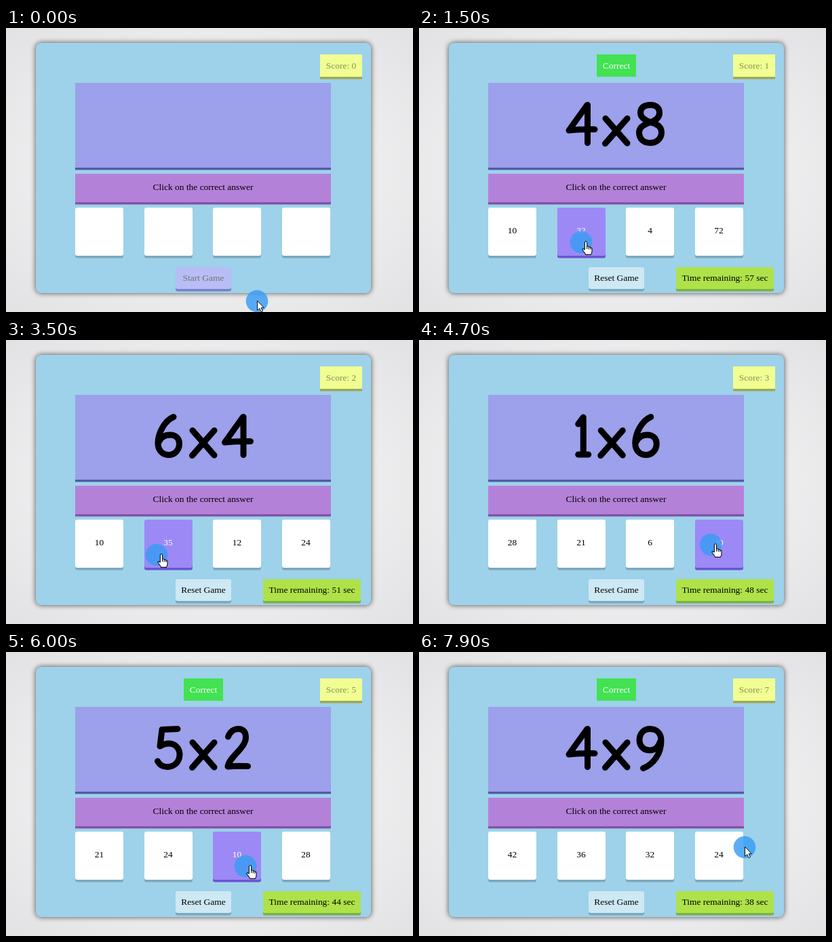
Recreate the animation shown at these times as an HTML page. Size 600 px wide and 419 px high, loop 8000 ms.

```html
<!DOCTYPE html>
<html lang="en">
<head>
<meta charset="utf-8">
<title>Times table game</title>
<style>
html, body { margin: 0; width: 100%; height: 100%; overflow: hidden; }
body {
  position: relative;
  font: 13.45px "Liberation Serif", "Times New Roman", serif;
  background: radial-gradient(ellipse at 50% 50%, #f4f4f5 30%, #e2e2e4 100%);
}
#stage { position: absolute; left: 0; top: 0; width: 600px; height: 419px; overflow: hidden; }
#stage > * { position: absolute; box-sizing: border-box; text-align: center; white-space: nowrap; }
#panel {
  left: 44px; top: 22px; width: 494px; height: 369px; border-radius: 8px;
  background: #9dd2ea; box-shadow: 0 0 7px 1px rgba(0, 0, 0, .55);
}
#score {
  left: 463px; top: 39px; width: 62px; height: 33px; line-height: 33px;
  background: #f1ff92; color: #888e5f; box-shadow: 0 3.4px #9da853;
}
#correct {
  left: 262px; top: 39px; width: 58px; height: 33px; line-height: 33px;
  background: #42e252; color: #fff;
}
#question {
  left: 102px; top: 81px; width: 377px; height: 125px;
  background: #9da0ea; box-shadow: 0 3.4px #535aa8;
}
#hint {
  left: 102px; top: 214.5px; width: 377px; height: 42px; line-height: 39px;
  background: #b481d9; box-shadow: 0 3.4px #8153a8;
}
.key {
  --h: 0%;
  --idle: #fff;
  border-radius: 3px;
  background: color-mix(in srgb, #9c89f6 var(--h), var(--idle));
  color: color-mix(in srgb, #fff var(--h), #000);
  box-shadow: 0 3.4px color-mix(in srgb, #6b54d3 var(--h), #7ea8bb);
}
.choice { top: 265px; width: 71px; height: 71px; line-height: 67px; }
#start { --idle: #cee8f4; left: 250px; top: 353px; width: 82px; height: 32px; line-height: 32px; }
#timer {
  left: 379px; top: 353px; width: 144px; height: 32px; line-height: 32px; border-radius: 2px;
  background: #aee248; box-shadow: 0 3.4px #83af41;
}
#art { left: 0; top: 0; }
#sum { fill: none; stroke: #000; stroke-width: 9; stroke-linecap: round; stroke-linejoin: round; }
</style>
</head>
<body>
<div id="stage">
  <div id="panel"></div>
  <div id="score"></div>
  <div id="correct">Correct</div>
  <div id="question"></div>
  <div id="hint">Click on the correct answer</div>
  <div class="key choice" style="left:102px"></div>
  <div class="key choice" style="left:203.5px"></div>
  <div class="key choice" style="left:305px"></div>
  <div class="key choice" style="left:406.5px"></div>
  <div class="key" id="start"></div>
  <div id="timer"></div>
  <svg id="art" width="600" height="419">
    <g id="sum"></g>
    <g id="pointer">
      <circle r="16.3" fill="#389df5" fill-opacity=".82"/>
      <path id="arrow" fill="#fff" stroke="#111" stroke-width="1"
        d="M.5-.5V13.5L3.8 10.6 6 15.8 8.4 14.8 6.2 9.7H10.3Z"/>
      <path id="hand" fill="#fff" stroke="#111" stroke-width="1.1" stroke-linejoin="round"
        d="M5.4 10.5V.6Q5.4-1.2 7-1.2T8.6.6V6.2Q10.8 5.4 11.3 7 13.2 6.4 13.8 8
           16 7.6 16 9.8V13Q16 16 14.4 18.4H6.8Q5.4 15.4 3 12.8 1.2 10.6 2.4 9.7 3.6 9.2 5.4 11.4M8.6 6.4V10M11.3 7V10.4M13.8 8V10.8"/>
    </g>
  </svg>
</div>
<script>
const LOOP = 8000, STEP = 100, FADE = 100, PRAISE = 350, BEGIN = 500;

const GLYPHS = {
  1: "M14 124L21.5 114V169M14 169H29",
  2: "M12 125C15 117 21 113.5 27 113.5C35 113.5 38 119 38 126C38 142 13 155 11.5 169C20 168 30 168 41 168.5",
  4: "M34.5 113.5V169.5M33.5 114L7 151C18 150 32 149 45 149.5",
  5: "M39 113.5L16 114.5L13 139C18 136 22 135 26 135C35 135 42 142 42 151C42 162 34 169.5 24 169.5C17 169.5 12 166 9.5 161",
  6: "M33 113.5C20 119 10 137 10 152C10 163 17 169.5 26 169.5C35 169.5 41.5 162 41.5 153C41.5 145 36 140 28 140C20 140 14 144 11 151",
  8: "M26 139C17 136 11 132 11 125C11 117 17 113.5 26 113.5C34 113.5 39 118 39 125C39 133 33 136 26 139C16 142 9 146 9 154C9 164 16 169.5 25 169.5C35 169.5 42 163 42 154C42 146 35 141 26 139Z",
  9: "M40.5 131C38 140 32 145 25 145C16 145 9.5 139 9.5 130C9.5 120 16 113.5 25 113.5C35 113.5 41.5 120 41.5 131C41.5 150 30 166 15 171.5",
  x: "M9.5 133.5L41.5 170M41.5 133.5L9 170.5"
};
const advance = c => c === "1" ? 38 : c === "x" ? 50 : 51.5;

// Each round starts when the previous one is answered.
const ROUNDS = [
  [500, "2x6", "63 12 16 30"],
  [1500, "4x8", "10 32 4 72"],
  [2300, "6x4", "10 35 12 24"],
  [4300, "1x6", "28 21 6 20"],
  [5200, "8x2", "18 42 16 35"],
  [5900, "5x2", "21 24 10 28"],
  [6200, "5x8", "21 24 56 40"],
  [7600, "4x9", "42 36 32 24"]
];

// Pointer path: time, x, y
const PATH = [
  [-100, 300, 366], [0, 370, 403], [250, 310, 372], [400, 289, 366], [800, 289, 366],
  [1300, 240, 315], [1500, 239, 316], [1800, 160, 150], [2100, 215, 190],
  [2200, 245, 323], [2300, 245, 318], [2600, 210, 150], [2900, 160, 128],
  [3200, 200, 200], [3400, 222, 317], [3600, 222, 317], [3900, 341, 310],
  [4200, 430, 302], [4800, 430, 302], [5100, 341, 312], [5200, 341, 312],
  [5400, 341, 240], [5700, 345, 310], [6000, 353, 316], [6300, 353, 316],
  [6700, 300, 170], [7000, 320, 170], [7400, 440, 300], [7650, 440, 300],
  [7780, 484, 292], [7900, 480, 288], [8000, 480, 288]
];

const $ = id => document.getElementById(id);
const keys = [...document.querySelectorAll(".key")];
const choices = keys.slice(0, 4);
const areas = keys.map(k => [k.offsetLeft, k.offsetTop, k.offsetWidth, k.offsetHeight]);

function pointerAt(t) {
  const i = Math.max(1, PATH.findIndex(p => p[0] >= t));
  const [t0, x0, y0] = PATH[i - 1], [t1, x1, y1] = PATH[i];
  const k = (t - t0) / (t1 - t0);
  return [x0 + (x1 - x0) * k, y0 + (y1 - y0) * k];
}

const inside = ([x, y], [l, t, w, h]) => x >= l && x <= l + w && y >= t && y <= t + h;

// Share of the last fade period spent over the area
function hover(t, area) {
  let n = 0;
  for (let i = 0; i < 20; i++) n += inside(pointerAt(t - FADE * i / 20), area);
  return n / 20;
}

function sumMarkup(text) {
  let x = 290.5 - [...text].reduce((w, c) => w + advance(c), 0) / 2;
  return [...text].map(c => {
    const path = `<path transform="translate(${x} 0)" d="${GLYPHS[c]}"/>`;
    x += advance(c);
    return path;
  }).join("");
}

const show = (el, on) => el.style.visibility = on ? "visible" : "hidden";

function draw(t) {
  const index = ROUNDS.filter(r => r[0] <= t).length - 1;
  const [since, sum, answers] = ROUNDS[index] || [0, "", "   "];
  const playing = index >= 0;

  $("score").textContent = "Score: " + Math.max(0, index);
  show($("correct"), index > 0 && t - since < PRAISE);
  $("sum").innerHTML = sumMarkup(sum);
  answers.split(" ").forEach((a, i) => choices[i].textContent = a);
  $("start").textContent = playing ? "Reset Game" : "Start Game";
  show($("timer"), playing);
  $("timer").textContent = `Time remaining: ${Math.ceil(60 - (t - BEGIN) * 3 / 1000)} sec`;

  keys.forEach((k, i) => k.style.setProperty("--h", hover(t, areas[i]) * 100 + "%"));

  const p = pointerAt(t), over = areas.some(a => inside(p, a));
  $("pointer").setAttribute("transform", `translate(${p})`);
  show($("hand"), over);
  show($("arrow"), !over);
}

const begin = performance.now();
let last = -1;
function tick() {
  const t = Math.floor((performance.now() - begin) % LOOP / STEP) * STEP;
  if (t !== last) draw(last = t);
  requestAnimationFrame(tick);
}
tick();
</script>
</body>
</html>
```
